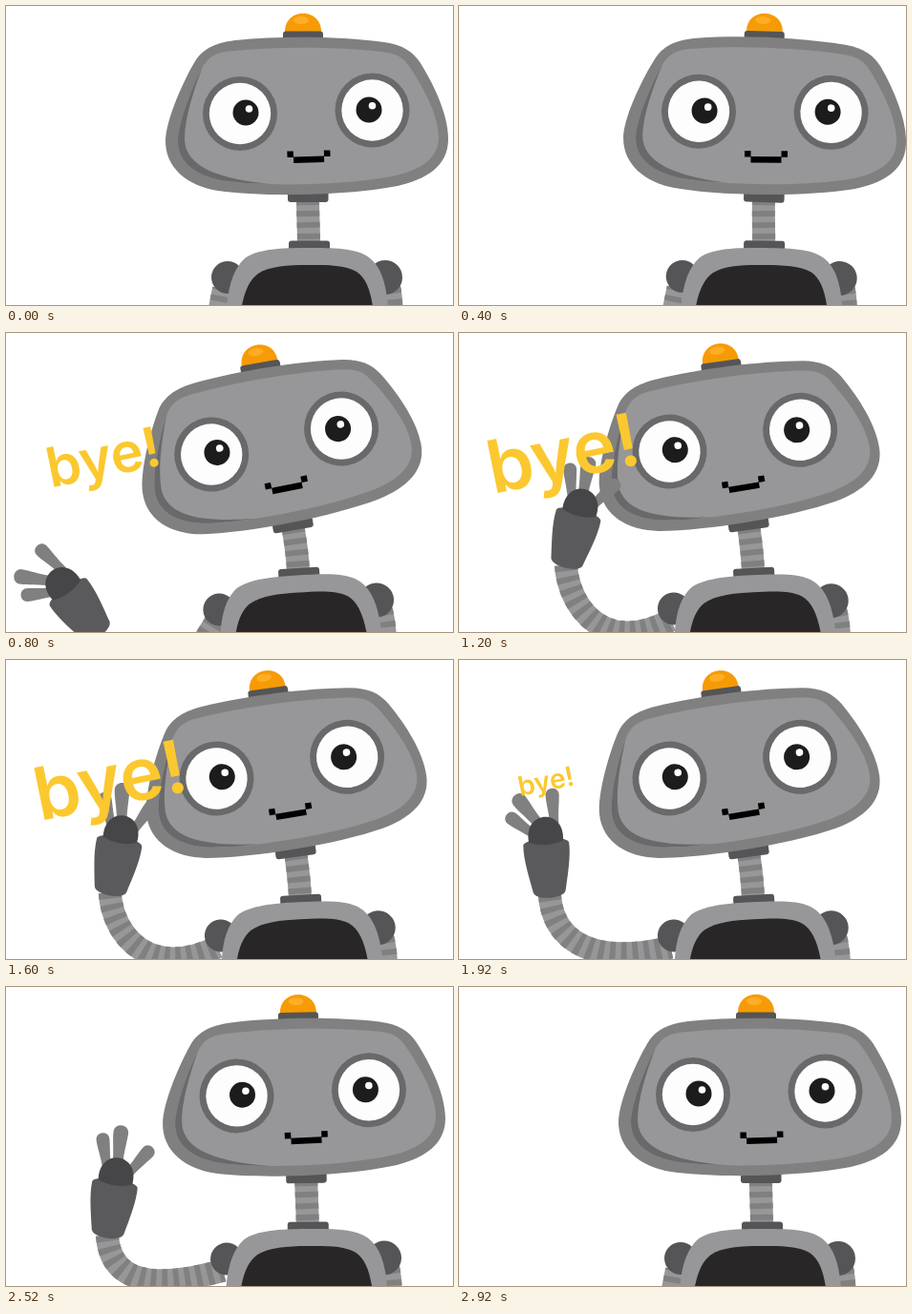
Animation, 468 px wide and 314 px high, one loop 3 s. Source, as an HTML page:

```html
<!DOCTYPE html>
<html lang="en">
<head>
<meta charset="utf-8">
<title>Waving robot</title>
<style>
  html, body { margin: 0; width: 100%; height: 100%; overflow: hidden; background: #fff; }
  svg { display: block; width: 468px; height: 314px; }
  .light { fill: #979698; }
  .edge { fill: #808081; }
  .dark { fill: #555557; }
  .ring { fill: #69686a; }
  .ink { fill: #1d1c1d; }
  .white { fill: #fdfdfd; }
  .tube path { fill: none; stroke: #979698; stroke-width: 24; }
  .tube path + path { stroke: #808081; stroke-dasharray: 6 6; }
  #bye { font: 600 77px Inter, Lato, sans-serif; fill: #fbc82f; text-anchor: middle; }
</style>
</head>
<body>
<svg viewBox="0 0 468 314">
  <g id="arm" class="tube"><path/><path/></g>
  <g id="neck" class="tube"><path/><path/></g>

  <g id="body">
    <g class="tube"><path d="M398 285Q405 303 403 335"/><path d="M398 285Q405 303 403 335"/></g>
    <circle class="dark" cx="232" cy="285" r="17"/>
    <circle class="dark" cx="397" cy="285" r="18"/>
    <rect class="dark" x="296" y="246.500" width="43" height="12" rx="3"/>
    <path class="light" d="M230 335C231 300 236 278 250 265C263 255 290 254 315 254C342 254 367 254 380 264C396 276 400 300 401 335Z"/>
    <path fill="#282627" d="M244 335C247 305 253 289 264 281C276 273 296 272 316 272C338 272 355 272 367 279C379 287 384 305 386 335Z"/>
  </g>

  <g id="head">
    <rect class="dark" x="295" y="194" width="42.500" height="12" rx="3"/>
    <path fill="#f69b06" d="M292 28C291 1 331 1 330 28Z"/>
    <ellipse cx="309" cy="15" rx="8" ry="4" fill="#ffad25"/>
    <rect class="dark" x="290" y="26.500" width="42" height="12" rx="3"/>
    <path class="edge" d="M167 140C168 118 186 78 198 58C207 43 223 38 240 36C290 31 350 32 396 38C416 41 426 48 434 60C450 86 463 116 463 140C463 168 440 182 410 189C360 199 270 201 222 194C190 189 166 170 167 140Z"/>
    <path class="light" d="M180 140C182 118 195 85 205 66C212 52 222 48 240 47C290 42 350 43 393 48C411 50 417 55 424 66C441 92 453 118 453 138C453 160 434 172 408 178C360 188 280 190 232 184C202 180 179 166 180 140Z"/>
    <path class="ring" d="M205 66C195 85 182 118 180 140C179 166 202 180 232 184Q255 187 278 187C225 182 188 170 187 140C187 118 196 90 205 66Z"/>
    <circle class="ring" cx="245" cy="113" r="39"/>
    <circle class="white" cx="245" cy="113" r="32.200"/>
    <circle class="ink" cx="251" cy="112" r="13.500"/>
    <circle class="white" cx="254.500" cy="108" r="3.800"/>
    <circle class="ring" cx="383.500" cy="109.500" r="39"/>
    <circle class="white" cx="383.500" cy="109.500" r="32.200"/>
    <circle class="ink" cx="380" cy="109" r="13.500"/>
    <circle class="white" cx="383.500" cy="104.800" r="3.800"/>
    <path fill="#000" transform="rotate(-1.5 317 158)" d="M294.500 152h6.500v6h32v-6h6.500v6.500h-6.500v6h-32v-6h-6.500z"/>
  </g>

  <g id="hand">
    <g id="fingers" class="edge"></g>
    <path fill="#5a5a5c" d="M-24 13C-23 5 23 5 24 13C25 28 20 48 17 63C15 72 -15 72 -17 63C-20 48 -25 28 -24 13Z"/>
    <path fill="#464648" d="M-18 10C-22 -24 22 -24 18 10C9 15 -9 15 -18 10Z"/>
  </g>
  <text id="bye">bye!</text>
</svg>
<script>
  const $ = id => document.getElementById(id);
  const LOOP = 3000, FRAMES = 30;
  const HEAD = { x: 315, y: 294 }, BODY = { x: 318, y: 430 };

  // Head tilt in degrees for each step; the body follows at a fraction.
  const tilt = [0, .3, .9, 1.6, 1.9, .2, -4, -8, -9.8, -9.6, -9, -8.4,
    ...Array(11).fill(-8), -7.6, -6, -1.1, 1.4, 2.1, 1, 0];
  const textSize = { 7: 25, 8: 63, 9: 79, 18: 78, 19: 31 };

  // Arm poses: wrist x, wrist y, forearm angle, hand angle, sag of the tube
  const hidden = [150, 440, -60, -80, 490];
  const right = [112, 244, 14, 10, 338], left = [95, 247, -4, -40, 322];
  const poses = {
    7: [112, 372, -58, -95, 470], 8: [97, 316, -36, -82, 440], 9: [98, 264, -15, -60, 360],
    10: [97, 248, -3, -40, 330], 11: [104, 245, 6, -12, 332],
    25: [106, 261, 8.5, 6, 320], 26: [72, 292, -44, -60, 365], 27: [70, 372, -70, -95, 470]
  };

  // Fingers: base x, base y, angle, scale
  const finger = "M-5 -8C-5 -22 -8 -34 -7.500 -41C-7 -50 7 -50 7.500 -41C7.500 -34 5 -22 5 -8Z";
  $("fingers").innerHTML = [[-9, 3, -14, .92], [0, 0, 0, 1.04], [8, 6, 36, .94]]
    .map(([x, y, a, s]) => `<path d="${finger}" transform="translate(${x} ${y}) rotate(${a}) scale(${s})"/>`).join("");

  function turn(x, y, deg, c) {
    const a = deg * Math.PI / 180, dx = x - c.x, dy = y - c.y;
    return [c.x + dx * Math.cos(a) - dy * Math.sin(a), c.y + dx * Math.sin(a) + dy * Math.cos(a)];
  }

  function armPose(i) {
    if (poses[i]) return poses[i];
    if (i < 12 || i > 24) return hidden;
    const k = (1 - Math.cos((i - 12) * 6 * Math.PI / 14)) / 2;
    return right.map((v, n) => v + (left[n] - v) * k);
  }

  function setTube(id, ...pts) {
    const [a, b, c, d] = pts.map(p => p.map(v => v.toFixed(2)).join(" "));
    for (const p of $(id).children) p.setAttribute("d", `M${a}C${b} ${c} ${d}`);
  }

  const place = (id, value) => $(id).setAttribute("transform", value);

  function draw(i) {
    const h = tilt[i], b = h * .355;
    place("head", `rotate(${h} ${HEAD.x} ${HEAD.y})`);
    place("body", `rotate(${b} ${BODY.x} ${BODY.y})`);
    setTube("neck", turn(316, 203, h, HEAD), turn(316, 220, h, HEAD),
      turn(317, 234, b, BODY), turn(317, 250, b, BODY));

    const [x, y, a, m, sag] = armPose(i);
    const palm = turn(x, y - 67, a, { x, y });
    setTube("arm", [x, y], [x + 3, y + 46], [x + 42, sag], turn(228, 297, b, BODY));
    place("hand", `translate(${palm}) rotate(${a})`);
    place("fingers", `rotate(${m - a})`);

    const size = textSize[i] || (i > 9 && i < 18 ? 84 : 0);
    const tx = 93 + (size - 31) * .4, ty = Math.min(153, 137 + (size - 31) * .42);
    $("bye").style.display = size ? "" : "none";
    place("bye", `translate(${tx} ${ty}) rotate(-11.5) scale(${size / 84})`);
  }

  // Steps alternate between 120 ms and 80 ms.
  function tick() {
    const t = performance.now() % LOOP;
    const i = 2 * Math.floor(t / 200) + (t % 200 >= 120 ? 1 : 0);
    draw(Math.min(i, FRAMES - 1));
    requestAnimationFrame(tick);
  }
  tick();
</script>
</body>
</html>
```
